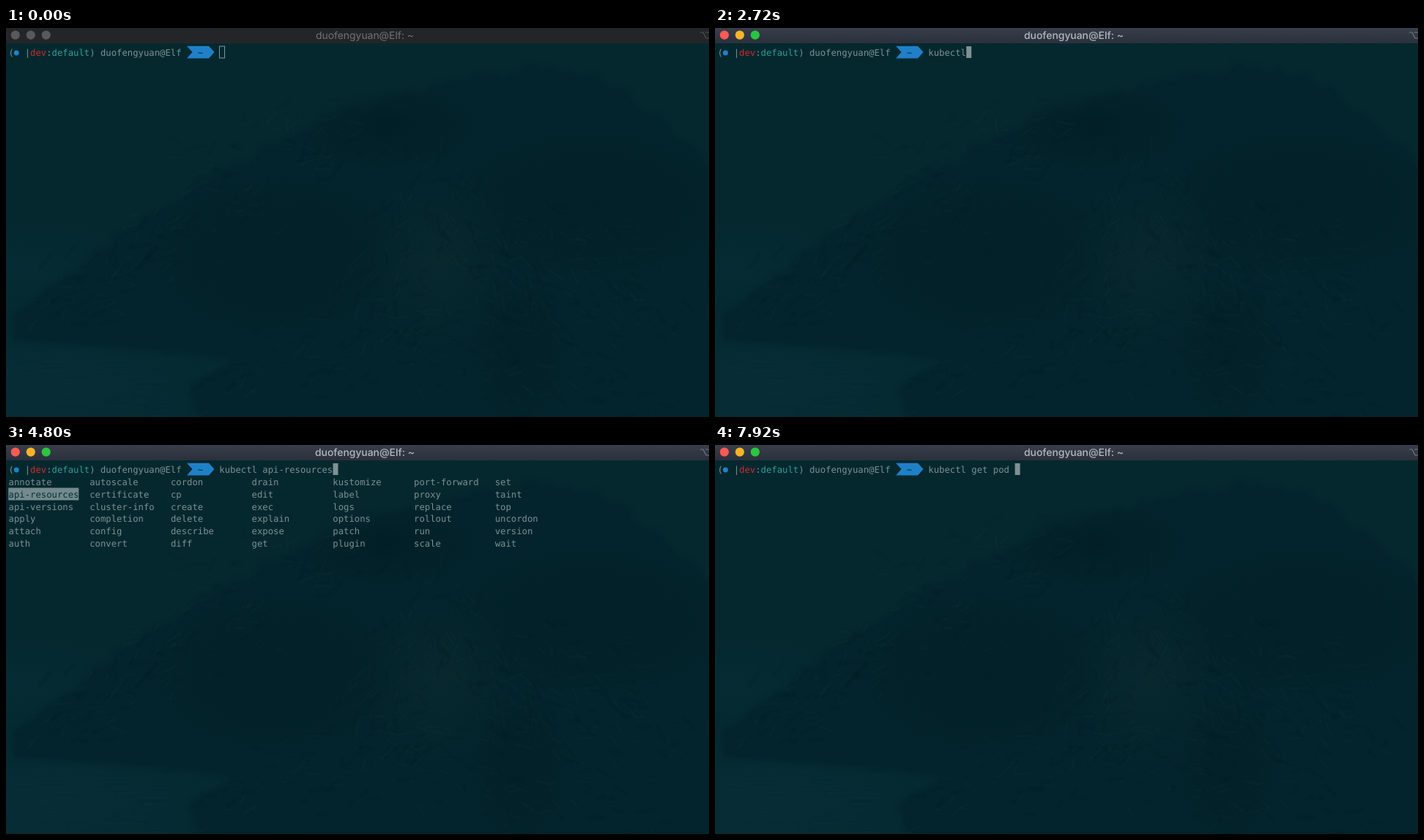
These frames come from a looping animation (960x532 px, 8000 ms). An HTML page with a canvas:

```html
<!DOCTYPE html>
<html lang="en">
<head>
<meta charset="utf-8">
<title>Terminal</title>
<style>
  html, body { margin: 0; width: 100%; height: 100%; overflow: hidden; background: #04262e; }
  canvas, svg { position: absolute; left: 0; top: 0; width: 960px; height: 532px; display: block; }
  text { white-space: pre; text-rendering: geometricPrecision; }
  .mono { font: 12.26px "DejaVu Sans Mono", monospace; fill: #7c9093; }
  #title { font: 500 13.9px Inter, sans-serif; fill: #b3b8c0; text-anchor: middle; }
  #alt { fill: none; stroke: #737984; stroke-width: 1.2; }
  .idle #title { fill: #707375; font-weight: 400; }
  .idle #alt { stroke: #505356; }
  .idle .light { fill: #58595b; }
  .idle #bar { fill: #232528; }
  .idle #cursor { fill: none; stroke: #82969a; }
</style>
</head>
<body>
<canvas id="scene" width="960" height="532"></canvas>
<svg id="term" viewBox="0 0 960 532">
  <defs>
    <linearGradient id="barFill" x1="0" y1="0" x2="0" y2="1">
      <stop offset="0" stop-color="#383e4a"/>
      <stop offset="1" stop-color="#2b303b"/>
    </linearGradient>
    <path id="beam" d="M-3-8q3 0 3 2.5v11q0 2.5-3 2.5M3-8q-3 0-3 2.5v11q0 2.500 3 2.500M-2 2h4"/>
  </defs>
  <rect id="bar" width="960" height="21" fill="url(#barFill)"/>
  <circle class="light" cx="12.8" cy="9.6" r="6.1" fill="#fb5a55"/>
  <circle class="light" cx="33.8" cy="9.6" r="6.1" fill="#f9b429"/>
  <circle class="light" cx="54.8" cy="9.6" r="6.1" fill="#2bc541"/>
  <text id="title" x="490" y="15">duofengyuan@Elf: ~</text>
  <g id="bell">
    <path d="M559 2.500c-4 0-4.600 3.500-4.900 6.300-.2 2.400-1 3.400-2.700 5.200h15.200c-1.700-1.800-2.500-2.800-2.700-5.200-.3-2.800-.9-6.300-4.900-6.300z" fill="#ecc25c"/>
    <circle cx="559" cy="15.400" r="2" fill="#a87a30"/>
  </g>
  <path id="alt" d="M948 6h4l4 8h4M955 6h5"/>

  <path d="M247 24.700h30l7.500 8.400-7.500 8.400h-30l7.500-8.400z" fill="#1f80c8"/>
  <circle cx="14.300" cy="34" r="3.500" fill="#1f80c8"/>
  <g id="prompt"></g>
  <g id="list"></g>
  <g id="menu">
    <rect x="3.300" y="-13.200" width="96" height="17" fill="#748a8d"/>
    <text id="picked" class="mono" x="3.500" style="fill:#03303a"></text>
  </g>
  <text id="command" class="mono" y="38"></text>
  <rect id="cursor" y="25" width="7" height="16" fill="#7e9194"/>
  <g id="mouse" fill="none" stroke-linecap="round">
    <use href="#beam" stroke="#061a20" stroke-width="2.600"/>
    <use href="#beam" stroke="#e8eeee" stroke-width="1.100"/>
  </g>
</svg>
<script>
const LOOP = 8000, CELL = 7.38, LEFT = 3.5, ROW = 16.87, INPUT_COL = 39;
const $ = id => document.getElementById(id);
const colX = col => LEFT + col * CELL;
const rowY = row => 38 + row * ROW;

const columns = [
  'annotate api-resources api-versions apply attach auth',
  'autoscale certificate cluster-info completion config convert',
  'cordon cp create delete describe diff',
  'drain edit exec explain expose get',
  'kustomize label logs options patch plugin',
  'port-forward proxy replace rollout run scale',
  'set taint top uncordon version wait'
].map(line => line.split(' '));

const span = { focus: 800, mouse: [400, 1840], list: [3360, 5920], bell: [3360, 4400], menu: [4480, 5920] };
const within = (t, [from, to]) => t >= from && t < to;

// Each entry is the command line from a given time on.
const edits = [{ at: 0, line: '' }];
const type = (at, gap, before, added) => [...added].forEach((_, i) =>
  edits.push({ at: at + i * gap, line: before + added.slice(0, i + 1) }));
type(1840, 146, '', 'kubectl');
type(2960, 0, 'kubectl', ' ');
columns[0].forEach((word, i) => edits.push({ at: span.menu[0] + i * 195, line: 'kubectl ' + word }));
for (let i = 1; i <= 4; i++) edits.push({ at: 5840 + i * 80, line: 'kubectl auth'.slice(0, -i) });
type(6440, 185, 'kubectl ', 'get pod ');

function addText(parent, col, row, str, fill) {
  const el = document.createElementNS('http://www.w3.org/2000/svg', 'text');
  el.setAttribute('class', 'mono');
  el.setAttribute('x', colX(col));
  el.setAttribute('y', rowY(row));
  el.textContent = str;
  if (fill) el.style.fill = fill;
  parent.append(el);
}

function buildText() {
  columns.forEach((words, c) => words.forEach((word, r) => addText($('list'), c * 15, r + 1, word)));
  addText($('prompt'), 0, 0, '(  |   :       ) duofengyuan@Elf');
  addText($('prompt'), 4, 0, 'dev', '#d0292b');
  addText($('prompt'), 8, 0, 'default', '#2aa198');
  addText($('prompt'), 35, 0, '~', '#03303a');
  $('command').setAttribute('x', colX(INPUT_COL));
}

function paintScene() {
  const g = $('scene').getContext('2d');
  let seed = 7;
  const rnd = () => (seed = seed * 16807 % 2147483647) / 2147483647;
  const spread = size => (rnd() + rnd() + rnd() - 1.5) * size;

  const glow = (x, y, rx, ry, rgb, alpha) => {
    g.save();
    g.translate(x, y);
    g.scale(rx, ry);
    const fade = g.createRadialGradient(0, 0, 0, 0, 0, 1);
    fade.addColorStop(0, `rgba(${rgb},${alpha})`);
    fade.addColorStop(1, `rgba(${rgb},0)`);
    g.fillStyle = fade;
    g.fillRect(-1, -1, 2, 2);
    g.restore();
  };
  const stroke = (x, y, angle, len, color) => {
    g.strokeStyle = color;
    g.lineWidth = 1 + rnd() * 2;
    g.beginPath();
    g.moveTo(x, y);
    g.lineTo(x + Math.cos(angle) * len, y + Math.sin(angle) * len);
    g.stroke();
  };
  // light and dark grain scattered about a line from (x, y) to (x + dx, y + dy)
  const crest = (x, y, dx, dy, width) => {
    const angle = Math.atan2(dy, dx);
    for (let i = 0; i < 110; i++) {
      const u = rnd();
      const color = i % 3 ? 'rgba(24,54,56,.22)' : 'rgba(0,24,32,.2)';
      stroke(x + dx * u + spread(width), y + dy * u + spread(width), angle + spread(.9), 6 + rnd() * 20, color);
    }
  };

  g.fillStyle = '#05282f';
  g.fillRect(0, 0, 960, 532);
  glow(60, 490, 330, 130, '9,48,58', .6);
  glow(20, 330, 160, 70, '9,48,58', .4);

  // island: a steep right side, a long left flank, a flat shoreline
  const skyline = x => 55 + (x < 740 ? .0033 : .01) * Math.abs(x - 740) ** 1.75;
  g.filter = 'blur(3px)';
  g.fillStyle = '#03242c';
  g.beginPath();
  for (let x = 10; x <= 990; x += 10) g.lineTo(x, skyline(x) + spread(8));
  for (const [x, y] of [[990, 560], [270, 560], [250, 490], [310, 455], [240, 444], [10, 427]]) g.lineTo(x, y);
  g.fill();

  g.filter = 'none';
  glow(520, 135, 130, 60, '1,27,35', .6);
  glow(370, 310, 190, 120, '1,28,36', .5);
  glow(800, 240, 210, 110, '1,28,36', .5);
  glow(700, 440, 70, 110, '1,28,36', .5);
  glow(590, 320, 100, 120, '14,46,49', .4);

  g.filter = 'blur(1px)';
  crest(480, 130, -220, 110, 70);
  crest(590, 200, -90, 220, 70);
  crest(600, 230, 150, 190, 60);
  crest(590, 385, -310, 100, 60);
  crest(690, 270, 220, 130, 80);
  crest(560, 420, 300, 90, 90);
  crest(60, 390, 170, -110, 50);
  for (let i = 0; i < 60; i++) stroke(rnd() * 210, 455 + rnd() * 75, 0, 10 + rnd() * 40, 'rgba(14,58,68,.2)');
  g.filter = 'none';
}

const show = (id, on) => $(id).style.display = on ? '' : 'none';

function render(t) {
  const { line } = edits.findLast(edit => t >= edit.at);
  const bell = within(t, span.bell), menu = within(t, span.menu);
  $('term').classList.toggle('idle', t < span.focus);
  $('command').textContent = line;
  $('cursor').setAttribute('x', colX(INPUT_COL + line.length) + .2);
  $('title').setAttribute('x', bell ? 478.5 : 490);
  show('bell', bell);
  show('list', within(t, span.list));
  show('menu', menu);
  if (menu) {
    const word = line.slice(8);
    $('menu').setAttribute('transform', `translate(0 ${rowY(columns[0].indexOf(word) + 1)})`);
    $('picked').textContent = word;
  }
  show('mouse', within(t, span.mouse));
  const left = (1 - Math.min(1, Math.max(0, (t - span.mouse[0]) / 320))) ** 2;
  $('mouse').setAttribute('transform', `translate(${592 + 30 * left} ${98 + 430 * left})`);
}

buildText();
paintScene();
const begin = performance.now();
function tick() {
  render((performance.now() - begin) % LOOP);
  requestAnimationFrame(tick);
}
tick();
</script>
</body>
</html>
```
